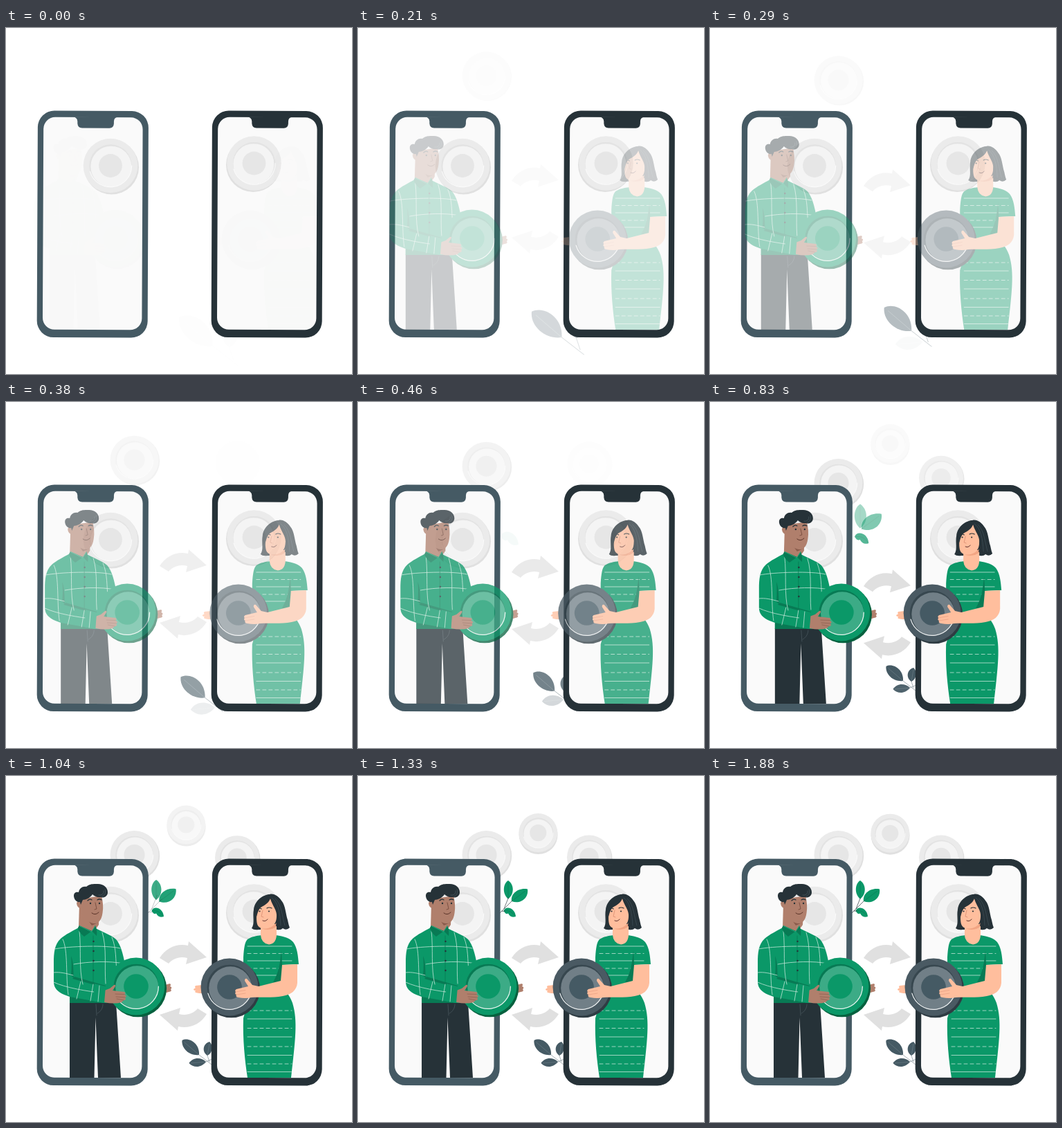
An HTML page for the animation above (2000 ms loop, 500x500 px).

```html
<!DOCTYPE html>
<html lang="en">
<head>
<meta charset="utf-8">
<title>Phone to phone coin exchange</title>
<style>
  html, body { margin: 0; width: 100%; height: 100%; overflow: hidden; background: #fff; }
  svg { display: block; width: 100%; height: 100%; }
  .line { fill: none; stroke-linecap: round; stroke-linejoin: round; }
</style>
</head>
<body>
<svg id="stage" viewBox="0 0 500 500"></svg>
<script>
const GREEN = '#0b9868', DEEP = '#087a54', INK = '#263238', SLATE = '#455a64';
const TAN = '#b07f6c', PEACH = '#ffbe9d', CHECK = '#c2e5d7';
const PALE_COIN = { side: '#e0e0e0', rim: '#ebebeb', lip: '#e3e3e3', face: '#f4f4f4', arc: '#fafafa', mark: '#e6e6e6' };
const GREEN_COIN = { side: '#06613f', rim: GREEN, lip: '#087a54', face: '#3cab86', arc: '#e6f5ef', mark: GREEN };
const GREY_COIN = { side: '#2f3c43', rim: '#4a5a63', lip: '#37474f', face: '#717f87', arc: '#edf0f1', mark: SLATE };

const path = (d, fill, extra = '') => `<path d="${d}" fill="${fill}" ${extra}/>`;
const line = (d, color, width = 1, extra = '') =>
  `<path class="line" d="${d}" stroke="${color}" stroke-width="${width}" ${extra}/>`;
const disc = (x, y, r, fill) => `<circle cx="${x}" cy="${y}" r="${r}" fill="${fill}"/>`;
const group = (id, body) => `<g id="${id}">${body}</g>`;

// Round coin with a visible edge towards (ex, ey).
function coin(x, y, r, c, ex = 2, ey = 2) {
  const a = r * .78;
  return disc(x + ex, y + ey, r, c.side) + disc(x, y, r, c.rim) +
    disc(x, y, r * .78, c.lip) + disc(x + ex * .5, y + ey * .5, r * .75, c.face) +
    line(`M${x - a * .96} ${y + a * .28}A${a} ${a} 0 0 0 ${x + a} ${y}`, c.arc, r * .03) +
    disc(x, y, r * .43, c.mark);
}

function phone(x, color) {
  return `<g transform="matrix(1 .005 -.0043 1 ${x + .5} -.6)">
    <rect x="46" y="119.7" width="160" height="327.6" rx="24" fill="${color}"/>
    <rect x="54.3" y="129" width="143.4" height="307" rx="17" fill="#fafafa"/>
    ${path('M97 128.5Q103 129 103.4 135V138Q104 144.5 110 144.5H149.5Q155.6 144.5 156 138V135Q156 129 162 128.5Z', color)}</g>`;
}

const arrow = path('M222 263C231 248 248 241 263 245L264 239L290 262L260 272L262 263C251 260 241 264 235 271Z', '#e0e0e0');

function man() {
  const shirt = 'M105 219C96 224 86 229 79 235C70 243 69 256 69 270V297C69 307 75 312 84 316L92 319V328H160V300L172 272C169 257 166 244 159 236C151 229 138 225 128 219Z';
  const checks = 'M70 250C90 246 145 244 165 249M69 284C78 283 86 285 97 288M98 272C120 268 150 267 170 271' +
    'M82 236C90 252 86 290 90 316M106 224C109 250 105 278 111 301M139 226C146 248 142 275 144 300' +
    'M153 233C160 250 158 266 160 280M69 298C86 306 116 311 143 314M108 297L102 322M126 301L122 325';
  return path('M92 327H159L166 436H133L129.5 349L127.5 436H92Z', INK) +
    line('M130 330L131 346M140 330C140 336 136 341 132 343', '#4c5b62', .7) +
    path('M229 302L237 300Q239 302 237 304L239 305Q240 307 238 308L239 310Q238 312 235 312L229 314Z', TAN) +
    path(shirt, GREEN) +
    path('M94 260C98 270 97 282 98 292L94 288C95 278 95 268 94 260Z', DEEP) +
    path('M99 290L144 303L143 306L96 293Z', DEEP) +
    path('M92 319L142 328H92Z', DEEP) +
    line(checks, CHECK, .8) +
    line('M126 231V298', DEEP, .8) +
    [239, 253, 267, 281].map(y => disc(126.5, y, 1.2, INK)).join('') +
    path('M106 185H135L134 215Q130 222 124 224L105 219Z', TAN) +
    path('M119 209Q126 214 133 212L124 216Z', '#8a5c4c') +
    path('M106 216L124 224L113 232Q104 225 104 219ZM124 224L129 216Q132 222 131 231Z', DEEP) +
    line('M106 216.5L123.5 225L129 217', '#32b284', .8) +
    path('M107 178L138 173C140 181 141 190 139.5 198C138 208 134 213.5 127 213C118 212 108 202 107 190Z', TAN) +
    path('M110 180Q103 178 102 184Q103 192 110 191Z', TAN) +
    path('M108 186L107 182C102 183 98 178 98 173C98 168 102 167 105 168C106 162 111 159 116 160C121 155 129 156 133 156C141 156 147 161 147 168C147 174 141 177 137 175C133 176 128 174 125 171C122 176 115 179 111 179Z', INK) +
    line('M134 172C138 173 142 170 141 166M139 174C143 172 145 168 143 164', '#53636b', .6) +
    line('M118 180Q121 177 124 179M132 179Q135 177 138 179', INK, 1.3) +
    disc(122, 184, 1.2, INK) + disc(135, 184, 1.2, INK) +
    line('M129 183L131 192L128 193', '#6f4638', .8) +
    line('M124 198Q129 202 134 197', '#5a3429', 1) +
    coin(188, 304, 41.5, GREEN_COIN, 2.6, 2.8) +
    path('M142 310L150 307L156 302Q159 301 158 304L154 310L171 312Q174 314 171 315.5L173 317Q175 319 172 320L173 322Q173 324 170 324L167 327Q157 330 142 327Z', TAN) +
    line('M171 315.5L158 315M172 320L159 319M170 324L160 322', '#8a5c4c', .7) +
    path('M128 300L144 304L142 328L126 325Z', GREEN) + line('M135 303L133 326', CHECK, .8);
}

function woman() {
  const dress = 'M369 230L390 230C402 232 410 234 415 240C421 248 422 260 423 272L399 273L400 299C401 309 410 316 414 328C422 354 418 382 412 436H349C345 410 342 380 343 350L352 318L343 290V262C344 248 345 240 349 236C355 232 362 231 369 230Z';
  const rows = [246, 256.5, 267, 278, 288, 339, 351, 364.5, 377, 391, 403.5, 416, 427.5];
  const stripes = rows.map((y, i) =>
    line(`M349 ${y}H413`, CHECK, .8, i % 2 ? 'stroke-dasharray="5 4"' : '')).join('');
  return path('M283 302L274 303Q272 305 274 306L271 308Q271 310 274 310L273 312Q275 314 283 314Z', PEACH) +
    path('M381 171C387 169 394 174 398 180C404 187 404 199 407 208C408 213 409 217 410 219Q405 224 400 220Q397 223 392 222L365 222Q358 223 355 220C360 213 356 203 358 193C359 182 369 172 381 171Z', INK) +
    `<clipPath id="dress"><path d="${dress}"/></clipPath>` +
    path(dress, GREEN) +
    `<g clip-path="url(#dress)">${stripes}${path('M398 252C396 268 396 280 386 298L401 300L399 273Z', DEEP)}</g>` +
    path('M368 214H391V230Q390 242.5 380 243.5Q369 242 368 230Z', PEACH) +
    path('M371 219Q382 222 391 212V217Q384 224 371 221Z', '#f2a583') +
    path('M366 184C362 193 361 207 363 214C365 221 374 222 381 219C389 216 391 209 391 203L393 188L382 177Z', PEACH) +
    path('M381 171C369 173 359 184 360 208C363 203 363 195 368 190C375 186 380 183 382 177C385 189 393 193 391 208L390 217Q400 216 401 205L398 181Z', INK) +
    line('M384 176C393 182 396 197 397 216M389 177C399 187 399 203 403 216', '#46565e', .6) +
    line('M364 192Q367 190 369 192M377 191Q380 189 384 191', INK, 1.2) +
    disc(366.5, 195.5, 1.1, INK) + disc(380, 195.5, 1.1, INK) +
    line('M371 194L369 203L372 204', '#d98d70', .8) +
    line('M371 209Q375 211 378 207', '#5a2d2a', 1) +
    coin(323, 305, 41.5, GREY_COIN, 2.6, 2.8) +
    path('M399 273L421 272V299C420 310 412 316 400 318C384 321 367 319 355 320Q346 322 336 320Q331 319 333 316Q330 315 332 312Q330 310 333 308L350 304L345 296Q345 292 348 293L356 302L365 304L397 296Z', PEACH) +
    line('M333 316L346 314M332 312L346 309.5', '#e59e81', .7);
}

const leaf = {
  a: path('M279 403C266 405 253 394 254.5 382C264 377 280 386 279 403Z', SLATE) + line('M258 385L279 403L297 417', '#708088', .6),
  b: path('M291 404C283 399 284 387 294 384C300 389 299 400 291 404Z', SLATE) + line('M294 387L291 404L294 413', '#708088', .6),
  c: path('M289 413C282 422 271 422 264.5 415C270 406 282 406 289 413Z', SLATE) + line('M267 415L289 413L298 409', '#708088', .6),
  d: path('M217 177.5C208.5 171 209 156 217 151C226 157 226 171 217 177.5Z', GREEN) + line('M217 154V177', DEEP, .6),
  e: path('M222 181C220 171 231 161 245 163.5C247 176 235 186 222 181Z', GREEN) + line('M242 166L222 181', DEEP, .6),
  f: path('M210.5 195C213 187 227 190 228 203C224 205 219 203 217 198.5Q214 201 210.5 195Z', GREEN) + line('M211 195Q221 193 227 202', DEEP, .6),
};

document.getElementById('stage').innerHTML =
  group('coinL', coin(185.5, 114, 35, PALE_COIN, 1.7, 1.5)) +
  group('coinR', coin(334, 117.5, 32, PALE_COIN, 1.5, 1.5)) +
  group('coinM', coin(260.3, 82.7, 28, PALE_COIN, .3, 3)) +
  group('arrows', arrow + `<g transform="rotate(180 256 303.5)">${arrow}</g>`) +
  Object.entries(leaf).map(([k, body]) => group('leaf-' + k, body)).join('') +
  group('stem', line('M205 198L222 181M211 192L217 177M208 195L212 195', INK, .7)) +
  phone(0, SLATE) + phone(252, INK) +
  coin(151, 199, 39.3, PALE_COIN, 1.7, 2.2) + coin(358.5, 195.5, 39.3, PALE_COIN, -1.2, 2.2) +
  group('man', man()) + group('woman', woman());

// delay and length in seconds, start offset, start scale about a point, own fade delay
const moves = [
  { id: 'man', at: 0, x: -30 },
  { id: 'woman', at: 0, x: 30 },
  { id: 'coinL', at: .083, y: -50 },
  { id: 'coinR', at: .375, y: -30 },
  { id: 'coinM', at: .55, len: 1.25, y: -30 },
  { id: 'arrows', at: .042, y: -50 },
  { id: 'leaf-a', at: 0, zoom: 2, o: [259, 346] },
  { id: 'leaf-b', at: 0, zoom: 2, o: [259, 346] },
  { id: 'leaf-c', at: 0, zoom: 2, o: [259, 346], fade: .25 },
  { id: 'leaf-d', at: .555, zoom: 1.5, o: [217, 162] },
  { id: 'leaf-e', at: .485, zoom: 1.5, o: [233.5, 171] },
  { id: 'leaf-f', at: .4, zoom: 1.5, o: [219.5, 197] },
  { id: 'stem', at: .8, zoom: 1.5, o: [213, 190] },
];
for (const m of moves) m.el = document.getElementById(m.id);

// cubic-bezier(.36, -.01, .5, 1.38): slow start, slight overshoot
const curve = (s, a, b) => 3 * (1 - s) ** 2 * s * a + 3 * (1 - s) * s * s * b + s ** 3;
function ease(x) {
  if (x <= 0) return 0;
  if (x >= 1) return 1;
  let lo = 0, hi = 1;
  for (let i = 0; i < 24; i++) {
    const mid = (lo + hi) / 2;
    if (curve(mid, .36, .5) < x) lo = mid; else hi = mid;
  }
  return curve(lo, -.01, 1.38);
}

const FPS = 24, LOOP = 2000, start = performance.now();

// Slides overshoot; zooms stop at full size.
function draw() {
  const ms = (performance.now() - start) % LOOP;
  const t = (Math.floor(ms * FPS / 1000 + .1) % 48 + 1) / FPS;
  for (const { el, at, len = 1, x = 0, y = 0, zoom = 1, o = [0, 0], fade = at } of moves) {
    const left = 1 - ease((t - at) / len);
    const k = 1 + (zoom - 1) * Math.max(0, left);
    el.setAttribute('transform',
      `translate(${x * left + o[0] * (1 - k)} ${y * left + o[1] * (1 - k)}) scale(${k})`);
    el.setAttribute('opacity', Math.min(1, Math.max(0, ease((t - fade) / len))));
  }
  requestAnimationFrame(draw);
}
draw();
</script>
</body>
</html>
```
